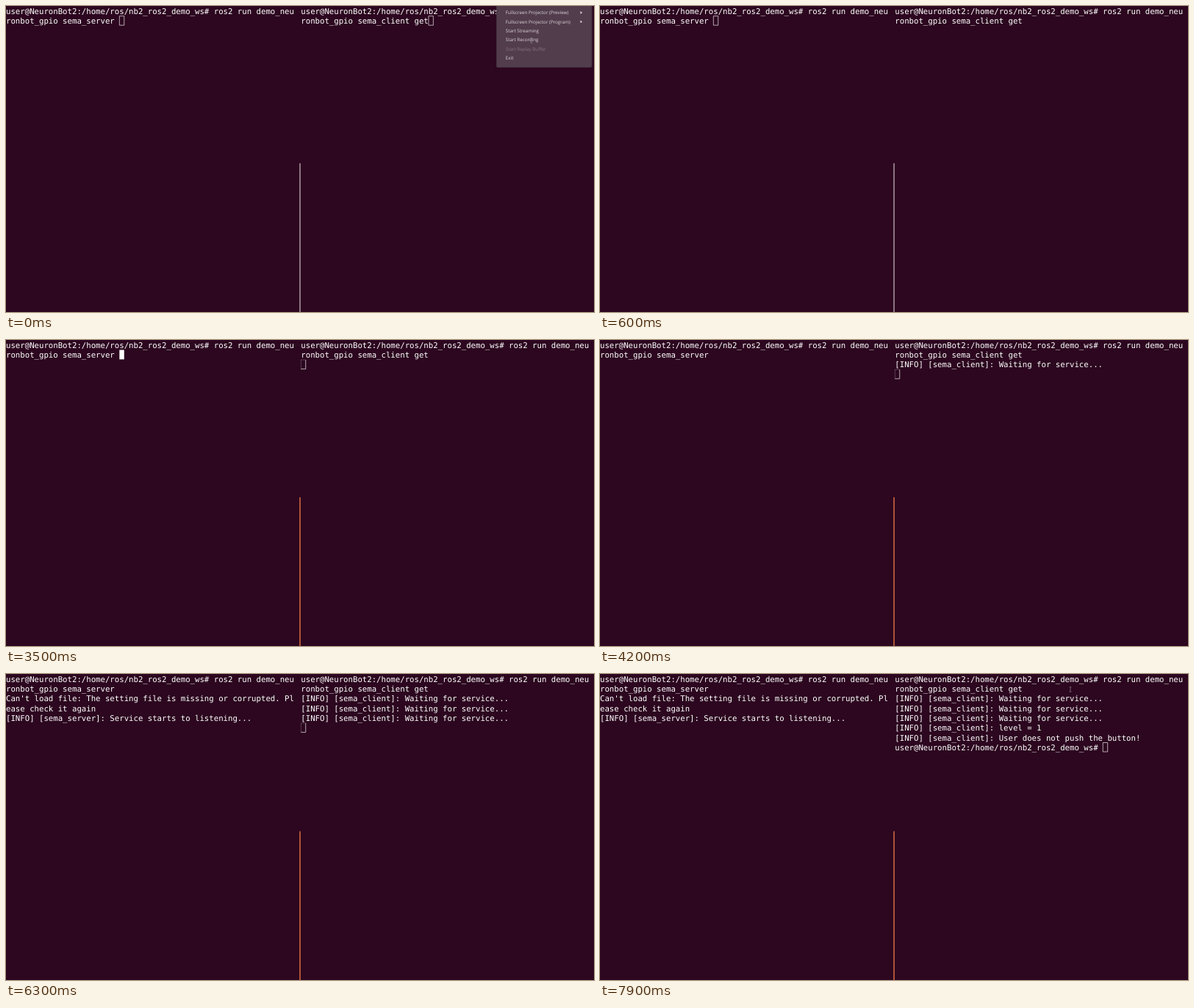
An HTML page that plays this animation: 800 px wide and 417 px high, repeating every 8 s.

```html
<!DOCTYPE html>
<html lang="en">
<head>
<meta charset="utf-8">
<title>Terminal session</title>
<style>
  html, body { margin: 0; width: 100%; height: 100%; overflow: hidden; background: #2c071f; }
  svg { display: block; width: 800px; height: 417px; }
  text { fill: #fff; white-space: pre; text-rendering: geometricPrecision; }
  #screen text { font: 10.68px "DejaVu Sans Mono", monospace; }
  #menu text { font: 6.25px "Open Sans", sans-serif; fill: #dcd5da; }
  #menu .off { fill: #84737f; }
  .solid { fill: #fff; }
  .hollow { fill: none; stroke: #d8ced4; stroke-width: .8; }
  .faint { opacity: .35; }
  #pointer { fill: none; stroke: #a5949f; stroke-width: .6; }
</style>
</head>
<body>
<svg viewBox="0 0 800 417">
  <rect width="800" height="417" fill="#2c071f"/>
  <rect id="divider" x="399.2" y="214.3" width="1.6" height="203"/>
  <g id="screen"></g>
  <g id="menu"><rect x="667.5" y="-2" width="129.5" height="85.5" rx="1.5" fill="#523d4c" stroke="#453040"/></g>
  <path id="pointer" d="M-1.3-3.2H1.3M0-3.2V3.2M-1.3 3.2H1.3"/>
</svg>
<script>
const LOOP = 8000, CELL = 6.43, ROW = 13.3, BASELINE = 10.8, LEFT = 0, RIGHT = 401.3;
const $ = id => document.getElementById(id);
const screen = $('screen'), menu = $('menu'), pointer = $('pointer'), divider = $('divider');
const timed = [];

function add(parent, tag, attrs, text = '') {
  const el = document.createElementNS('http://www.w3.org/2000/svg', tag);
  for (const key in attrs) el.setAttribute(key, attrs[key]);
  el.textContent = text;
  return parent.appendChild(el);
}

function show(el, from = 0, to = LOOP) {
  timed.push({ el, from, to });
}

function line(x, row, text, from) {
  show(add(screen, 'text', { x, y: row * ROW + BASELINE }, text), from);
}

function solid(pane, col, row, from, to) {
  const x = pane + col * CELL, y = row * ROW;
  show(add(screen, 'rect', { class: 'solid', x, y: y + .2, width: CELL, height: ROW - .4 }), from, to);
}

function hollow(pane, col, row, from, to) {
  const x = pane + col * CELL, y = row * ROW + .4, w = CELL, h = ROW - .8;
  const edge = col ? '' : ' faint';
  show(add(screen, 'path', { class: 'hollow' + edge, d: `M${x} ${y + h}V${y}H${x + w}` }), from, to);
  show(add(screen, 'path', { class: 'hollow', d: `M${x + w} ${y}V${y + h}H${x}` }), from, to);
}

const prompt = 'user@NeuronBot2:/home/ros/nb2_ros2_demo_ws#';
const client = '[INFO] [sema_client]: ';
const waiting = client + 'Waiting for service...';

// Server pane
line(LEFT, 0, prompt + ' ros2 run demo_neu');
line(LEFT, 1, 'ronbot_gpio sema_server');
line(LEFT, 2, "Can't load file: The setting file is missing or corrupted. Pl", 6300);
line(LEFT, 3, 'ease check it again', 6300);
line(LEFT, 4, '[INFO] [sema_server]: Service starts to listening...', 6300);
hollow(LEFT, 24, 1, 0, 3500);
solid(LEFT, 24, 1, 3500, 4100);
solid(LEFT, 24, 1, 4700, 5300);
solid(LEFT, 24, 1, 5500, 5600);
solid(LEFT, 0, 2, 5600, 6200);
solid(LEFT, 0, 5, 6800, 7400);

// Client pane
line(RIGHT, 0, prompt + ' ros2 run demo_neu');
line(RIGHT, 1, 'ronbot_gpio sema_client get');
line(RIGHT, 2, waiting, 3800);
line(RIGHT, 3, waiting, 4800);
line(RIGHT, 4, waiting, 5700);
line(RIGHT, 5, client + 'level = 1', 6400);
line(RIGHT, 6, client + 'User does not push the button!', 6500);
line(RIGHT, 7, prompt, 6600);
hollow(RIGHT, 27, 1, 0, 300);
solid(RIGHT, 27, 1, 300, 600);
solid(RIGHT, 27, 1, 1200, 1800);
solid(RIGHT, 0, 2, 2000, 2600);
solid(RIGHT, 0, 2, 3200, 3500);
[3500, 3800, 4800, 5700, 6400, 6500, 6600].forEach((from, i, starts) => {
  if (i < 6) hollow(RIGHT, 0, 2 + i, from, starts[i + 1]);
});
hollow(RIGHT, 44, 7, 6600);

['Fullscreen Projector (Preview)', 'Fullscreen Projector (Program)', 'Start Streaming',
 'Start Recording', 'Start Replay Buffer', 'Exit'].forEach((label, i) => {
  const y = 9 + i * 12.4;
  add(menu, 'text', { x: 679.8, y: y + 2.2, class: i === 4 ? 'off' : '' }, label);
  if (i < 2) add(menu, 'path', { d: `M781.5 ${y - 1.9}l2.6 1.9l-2.6 1.9z`, fill: '#dcd5da' });
});

const clamp = v => Math.max(0, Math.min(1, v));
// Stops are [time, x, y]; the pointer is hidden outside them.
const paths = [
  [[0, 715, 47], [100, 715, 47], [500, 490, 60], [600, 490, 60]],
  [[7500, 560, 212], [7750, 672, 10], [7900, 640, 21], [LOOP, 640, 21]]
];

function placePointer(t) {
  const path = paths.find(p => t >= p[0][0] && t < p[p.length - 1][0]);
  pointer.style.visibility = path ? 'visible' : 'hidden';
  if (!path) return;
  const i = path.findIndex(stop => t < stop[0]);
  const [t0, x0, y0] = path[i - 1], [t1, x1, y1] = path[i];
  const k = (t - t0) / (t1 - t0);
  pointer.setAttribute('transform', `translate(${x0 + (x1 - x0) * k} ${y0 + (y1 - y0) * k})`);
}

function draw() {
  const now = performance.now() % LOOP;
  const t = Math.floor(now / 100) * 100;
  for (const { el, from, to } of timed) {
    el.style.visibility = t >= from && t < to ? 'visible' : 'hidden';
  }
  divider.setAttribute('fill', t < 3500 ? '#a58f9d' : '#cf663f');
  menu.style.opacity = 1 - clamp(t / 300);
  placePointer(t);
  requestAnimationFrame(draw);
}
draw();
</script>
</body>
</html>
```
